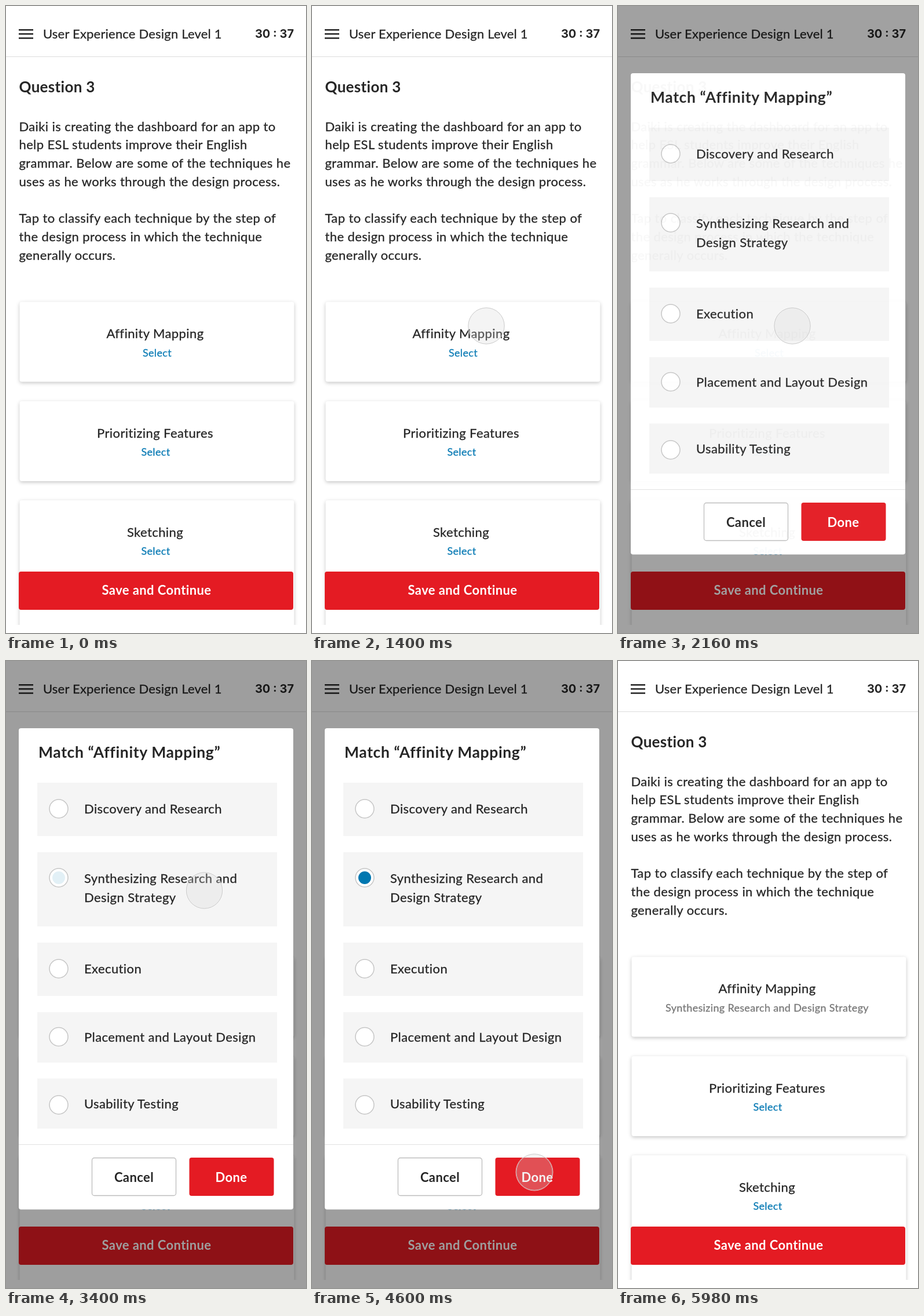
An HTML page for the animation above (7140 ms loop, 518 by 1082 pixels).

```html
<!DOCTYPE html>
<html lang="en">
<head>
<meta charset="utf-8">
<title>Tap to classify</title>
<style>
  html, body { margin: 0; width: 100%; height: 100%; overflow: hidden; background: #fff; }
  svg { display: block; width: 100%; height: 100%; }
  text {
    font-family: Lato, "Open Sans", sans-serif; font-size: 22px; letter-spacing: .4px;
    color: #262626; fill: currentColor; stroke: currentColor; stroke-width: .3px;
  }
  .title { letter-spacing: .2px; }
  .body { letter-spacing: .36px; word-spacing: .2px; }
  .heading { font-size: 26px; font-weight: 700; letter-spacing: .3px; }
  .match { font-size: 26.5px; font-weight: 700; letter-spacing: .62px; }
  .timer { font: 700 20px Inter, sans-serif; letter-spacing: 0; }
  .mid { text-anchor: middle; }
  .button { font-weight: 700; }
  .heading, .match, .timer, .button { stroke: none; }
  .light { color: #fff; }
  .link { font-size: 18px; letter-spacing: .35px; color: #0c7cb5; }
  .answer { font-size: 18px; letter-spacing: .33px; color: #777; }
  .card { fill: #fff; filter: drop-shadow(0 2px 3px rgba(0, 0, 0, .23)); }
  .red { fill: #e41b23; }
  .radio { fill: #fff; stroke: #c6c6c6; stroke-width: 1.5; }
</style>
</head>
<body>
<svg viewBox="0 0 518 1082">
  <defs><clipPath id="page"><rect width="518" height="1068"/></clipPath></defs>
  <rect width="518" height="1082" fill="#fff"/>
  <path d="M22 41.2h25M22 48.3h25M22 55.4h25" stroke="#222" stroke-width="2.5"/>
  <text x="64" y="56.3" class="title">User Experience Design Level 1</text>
  <text x="463.5" y="55.2" class="timer mid">30 : 37</text>
  <path d="M0 87.5h518" stroke="#dcdcdc"/>
  <text x="22.5" y="149" class="heading">Question 3</text>
  <g id="prompt"></g>
  <g id="cards" clip-path="url(#page)"></g>
  <rect x="22" y="976" width="474" height="66" rx="4" class="red"/>
  <text x="260" y="1016.3" class="button light mid">Save and Continue</text>

  <g id="dialog">
    <rect width="518" height="1082" opacity=".38"/>
    <rect x="22" y="116" width="474" height="830.5" rx="4" fill="#fff"/>
    <text x="56" y="167" class="match">Match “Affinity Mapping”</text>
    <g id="options"></g>
    <circle id="dot" cx="91" cy="374" r="11" fill="#0077b0"/>
    <path d="M22 834.5h474" stroke="#e2e2e2"/>
    <rect x="148.5" y="857.5" width="145" height="65" rx="4" fill="#fff" stroke="#bdbdbd" stroke-width="1.3"/>
    <text x="221" y="899" class="button mid">Cancel</text>
    <rect x="316.5" y="857" width="146" height="66" rx="4" class="red"/>
    <text x="389" y="899" class="button light mid">Done</text>
  </g>

  <g id="touch">
    <circle r="31.5" fill="#d6d6d6" fill-opacity=".28"/>
    <circle r="32" fill="none" stroke="#fff" stroke-opacity=".6"/>
    <circle r="31.2" fill="none" stroke="#c2c2c2" stroke-opacity=".85"/>
  </g>
</svg>
<script>
const LOOP = 7140;
const CLOSE = 5065;
const el = id => document.getElementById(id);
const label = (x, y, cls, str) => `<text x="${x}" y="${y}" class="${cls}">${str}</text>`;

el('prompt').innerHTML = [
  'Daiki is creating the dashboard for an app to',
  'help ESL students improve their English',
  'grammar. Below are some of the techniques he',
  'uses as he works through the design process.',
  '',
  'Tap to classify each technique by the step of',
  'the design process in which the technique',
  'generally occurs.',
].map((line, i) => label(22.5, 215.6 + 31.75 * i, 'body', line)).join('');

el('cards').innerHTML = [
  [510.5, 138, 'Affinity Mapping', 261],
  [682, 138, 'Prioritizing Features', 258.5],
  [853, 240, 'Sketching', 258.5],
].map(([y, h, name, x]) =>
  `<rect x="23.5" y="${y}" width="474" height="${h}" rx="4" class="card"/>` +
  label(257.5, y + 62.7, 'mid', name) +
  label(x, y + 94.3, 'link mid', 'Select')).join('');
const choice = document.querySelector('#cards .link');

// Each option: box top, height, radio centre, first baseline, lines
el('options').innerHTML = [
  [210, 92, 255, 262.8, 'Discovery and Research'],
  [330, 128, 374, 382.8, 'Synthesizing Research and', 'Design Strategy'],
  [486, 92, 531, 538.6, 'Execution'],
  [606, 87, 648.5, 657.3, 'Placement and Layout Design'],
  [720.5, 86.5, 766, 771.8, 'Usability Testing'],
].map(([y, h, cy, base, ...lines]) =>
  `<rect x="54" y="${y}" width="414" height="${h}" fill="#f5f5f5"/>` +
  `<circle cx="91" cy="${cy}" r="16" class="radio"/>` +
  lines.map((line, i) => label(135, base + 33 * i, '', line)).join('')).join('');

const clamp = v => Math.min(1, Math.max(0, v));
const span = (t, from, to) => clamp((t - from) / (to - from));

function bezier(x1, y1, x2, y2) {
  const at = (a, b, s) => 3 * a * s * (1 - s) ** 2 + 3 * b * s * s * (1 - s) + s ** 3;
  return x => {
    if (x <= 0 || x >= 1) return clamp(x);
    let lo = 0, hi = 1;
    for (let i = 0; i < 24; i++) {
      const s = (lo + hi) / 2;
      if (at(x1, x2, s) < x) lo = s; else hi = s;
    }
    return at(y1, y2, lo);
  };
}
const ease = bezier(.25, .1, .25, 1);
const easeOut = bezier(0, 0, .58, 1);

const straight = v => v;
const bent = v => (9 * v + 32.5 * v ** 6) / 41.5;
const moves = [
  { from: 820, to: 1400, a: [550, 283], b: [301, 552], bend: straight },
  { from: 2585, to: 3020, a: [301, 552], b: [342.5, 396], bend: straight },
  { from: 3740, to: 4600, a: [342.5, 396], b: [384, 882], bend: bent },
  { from: 5850, to: 6250, a: [384, 882], b: [716, 454], bend: straight },
];

function touchAt(t) {
  const { from, to, a, b, bend } = moves.findLast(m => t >= m.from) || moves[0];
  const v = ease(span(t, from, to));
  return [a[0] + (b[0] - a[0]) * bend(v), a[1] + (b[1] - a[1]) * v];
}

function draw(t) {
  const answered = t >= CLOSE;
  choice.textContent = answered ? 'Synthesizing Research and Design Strategy' : 'Select';
  choice.setAttribute('class', answered ? 'answer mid' : 'link mid');
  choice.setAttribute('x', answered ? 257.5 : 261);
  const shown = answered ? 1 - easeOut(span(t, CLOSE, 5380)) : span(t, 1870, 2170);
  el('dialog').setAttribute('opacity', shown);
  el('dot').setAttribute('opacity', easeOut(span(t, 3380, 3680)));
  el('touch').setAttribute('transform', `translate(${touchAt(t)})`);
}

const start = performance.now();
function tick() {
  draw((performance.now() - start) % LOOP);
  requestAnimationFrame(tick);
}
tick();
</script>
</body>
</html>
```
